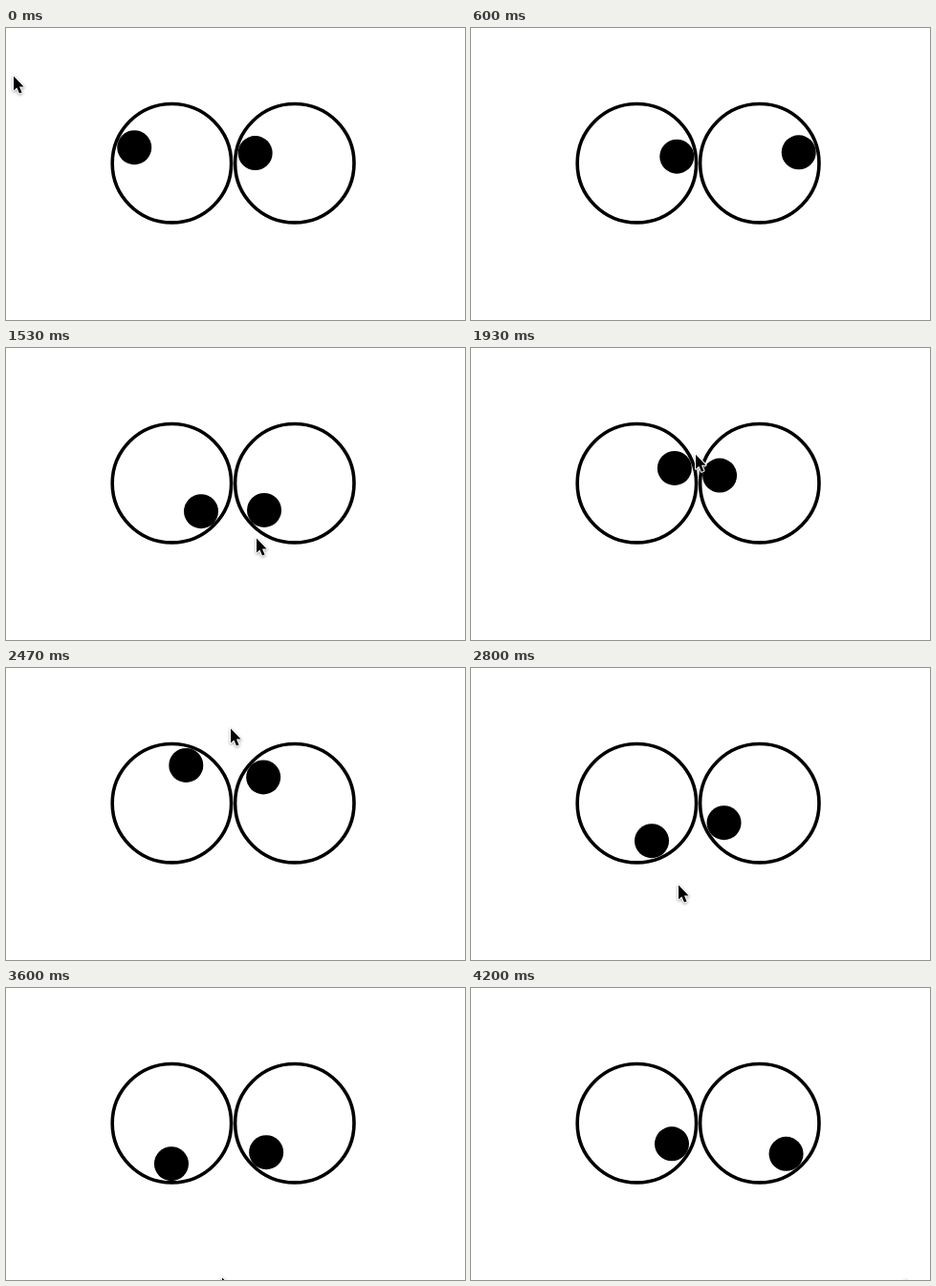
An HTML page with a canvas for the animation above (4.27 s loop, 480 by 306 pixels).

```html
<!DOCTYPE html>
<html>
<head>
<meta charset="utf-8">
<title>Following eyes</title>
<style>
html, body { margin: 0; width: 100%; height: 100%; overflow: hidden; background: #fff; }
canvas { display: block; }
</style>
</head>
<body>
<canvas id="stage" width="480" height="306"></canvas>
<script>
const ctx = document.getElementById('stage').getContext('2d');
const LOOP = 4270, STEPS = 64;
const EYES = [173.4, 301.8], EYE_Y = 141.7;
const RADIUS = 62.2, ORBIT = 42.5, PUPIL = 18;
const GAZE_SHIFT = -24;

// Turning points of the pointer: step, x, y
const PATH = [
  [-1, -6, 56], [0, 8, 49], [7, 522, -25], [8, 522, 87], [15, 531, 647],
  [19, 308, 302], [22, 259, 201], [23, 262, 198], [31, 226, 81],
  [36, 228, 60], [37, 235, 62], [39, 227, 147], [42, 217, 226],
  [47, 83, 243], [48, 55, 240], [51, 55, 240], [53, 196, 275],
  [54, 226, 302], [60, 459, 296], [62, 459, 296], [63, 454, 304]
];

const ARROW = new Path2D('M0 1.5V16.5L3.4 13.4 6 19.5 8.6 18.4 6 12.4H10.6Z');

function pointerAt(step) {
  const i = Math.max(1, PATH.findIndex(p => p[0] >= step));
  const [s0, x0, y0] = PATH[i - 1], [s1, x1, y1] = PATH[i];
  const f = (step - s0) / (s1 - s0);
  return [x0 + (x1 - x0) * f, y0 + (y1 - y0) * f];
}

function circle(x, y, r) {
  ctx.beginPath();
  ctx.arc(x, y, r, 0, 2 * Math.PI);
}

function drawEye(x, gx, gy) {
  circle(x, EYE_Y, RADIUS);
  ctx.lineWidth = 3.6;
  ctx.strokeStyle = '#000';
  ctx.stroke();
  const angle = Math.atan2(gy - EYE_Y, gx - x);
  circle(x + ORBIT * Math.cos(angle), EYE_Y + ORBIT * Math.sin(angle), PUPIL);
  ctx.fillStyle = '#000';
  ctx.fill();
}

function drawPointer(x, y) {
  ctx.save();
  ctx.translate(x, y);
  ctx.lineWidth = 2;
  ctx.lineJoin = 'round';
  ctx.strokeStyle = '#fff';
  ctx.shadowColor = 'rgba(0,0,0,.4)';
  ctx.shadowBlur = 3;
  ctx.shadowOffsetY = 1;
  ctx.stroke(ARROW);
  ctx.shadowColor = 'transparent';
  ctx.fillStyle = '#000';
  ctx.fill(ARROW);
  ctx.restore();
}

let start;
function draw(now) {
  start ??= now;
  const t = (now - start) % LOOP;
  const step = Math.min(STEPS - 1, Math.floor(t * 0.015 + 0.06));
  const [gx, gy] = pointerAt(step - 1); // the eyes trail by one step
  ctx.fillStyle = '#fff';
  ctx.fillRect(0, 0, 480, 306);
  for (const x of EYES) drawEye(x, gx + GAZE_SHIFT, gy);
  drawPointer(...pointerAt(step));
  requestAnimationFrame(draw);
}
requestAnimationFrame(draw);
</script>
</body>
</html>
```
